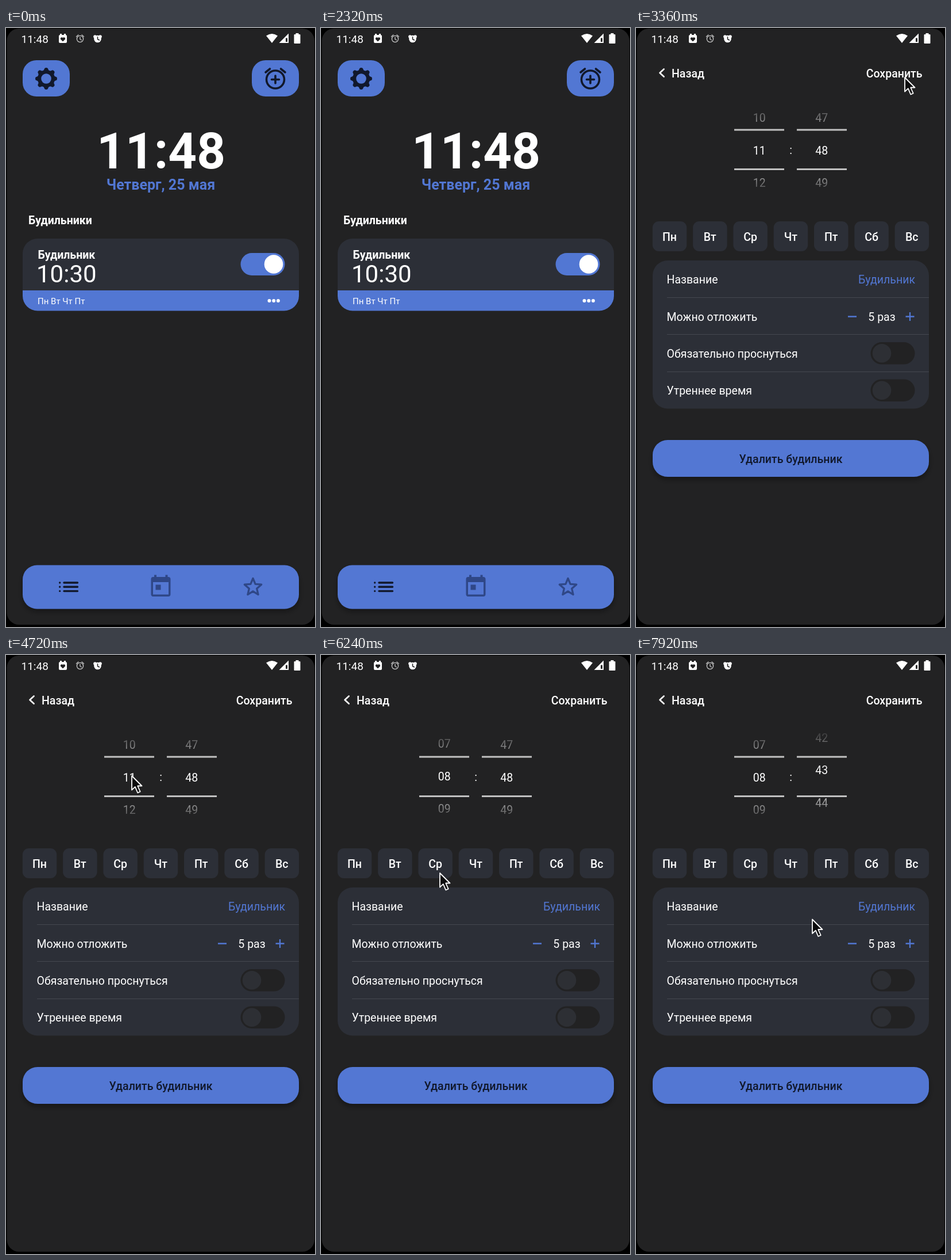
An HTML page for the animation above (8000 ms loop, 538 px wide and 1041 px high).

```html
<!DOCTYPE html>
<html lang="ru">
<head>
<meta charset="utf-8">
<title>Будильник</title>
<style>
  html, body { margin: 0; width: 100%; height: 100%; overflow: hidden; background: #000; }
  svg { display: block; width: 538px; height: 1041px; }
  text { font-family: Roboto, "Noto Sans", sans-serif; font-size: 19.5px; fill: #fff; }
  .bold { font-weight: 700; }
  .medium { font-weight: 500; }
  .mid { text-anchor: middle; }
  .end { text-anchor: end; }
  .line { fill: none; stroke-linecap: round; stroke-linejoin: round; }
</style>
</head>
<body>
<svg viewBox="0 0 538 1041" xmlns="http://www.w3.org/2000/svg">
  <defs>
    <linearGradient id="fade" gradientUnits="userSpaceOnUse" x1="0" y1="127" x2="0" y2="298">
      <stop offset="0" stop-color="#fff" stop-opacity="0"/>
      <stop offset=".44" stop-color="#fff"/>
      <stop offset=".56" stop-color="#fff"/>
      <stop offset="1" stop-color="#fff" stop-opacity="0"/>
    </linearGradient>
    <mask id="wheelMask" maskUnits="userSpaceOnUse" x="160" y="127" width="220" height="171">
      <rect x="160" y="127" width="220" height="171" fill="url(#fade)"/>
    </mask>
    <filter id="shadow" x="-10%" y="-30%" width="120%" height="170%">
      <feDropShadow dx="0" dy="5" stdDeviation="5" flood-color="#000" flood-opacity=".35"/>
    </filter>
    <clipPath id="cardClip"><rect x="29" y="366" width="481" height="125.500" rx="26"/></clipPath>
  </defs>

  <rect x="1.500" y="1" width="535.500" height="1036" rx="21" fill="#222223"/>

  <g id="status" fill="#fff">
    <text x="26.500" y="26" style="font-size:19px">11:48</text>
    <path d="M94 12h10a2 2 0 0 1 2 2v10a2 2 0 0 1-2 2H94a2 2 0 0 1-2-2V14a2 2 0 0 1 2-2zM94 10h3v3h-3zM101 10h3v3h-3z"/>
    <path d="M99 23.500l-4-4a2.400 2.400 0 0 1 4-2.500a2.400 2.400 0 0 1 4 2.500z" fill="#222223"/>
    <g class="line" stroke="#c9c9c9" stroke-width="1.300">
      <circle cx="129" cy="19" r="5.600"/>
      <path d="M129 16v3.500l2.500 1.500M122.500 15l3.500-3M135.500 15l-3.500-3"/>
    </g>
    <circle cx="159.500" cy="19" r="6.300"/>
    <circle cx="155" cy="15" r="2.800"/><circle cx="164" cy="15" r="2.800"/>
    <path class="line" d="M159.500 15.500v4l3 1.500" stroke="#222223" stroke-width="1.500"/>
    <path d="M453 13.500q10-7 20 0L463 26z"/>
    <path d="M492 9.500V26H475.500z"/>
    <path d="M487 17.500h3v6.500h-3z" fill="#222223"/>
    <path d="M504.500 9h5v2h2a1 1 0 0 1 1 1v14a1 1 0 0 1-1 1h-9a1 1 0 0 1-1-1V12a1 1 0 0 1 1-1h2z"/>
  </g>

  <g id="home">
    <rect x="29" y="56" width="82" height="63" rx="24" fill="#5277d3"/>
    <rect x="428" y="56" width="82" height="63" rx="24" fill="#5277d3"/>
    <path id="gear" fill="#11182b"/>
    <circle cx="70" cy="88" r="8.800" fill="#5277d3"/>
    <g class="line" stroke="#11182b" stroke-width="3.600">
      <circle cx="469" cy="89.500" r="15.500"/>
      <path d="M469 83v13M462.500 89.500h13M452 77l7.500-6M486 77l-7.500-6"/>
    </g>

    <text class="bold mid" x="270" y="244" style="font-size:87px">11:48</text>
    <text class="bold mid" x="269.500" y="280.500" style="font-size:25px;fill:#5277d3">Четверг, 25 мая</text>
    <text class="bold" x="39" y="341">Будильники</text>

    <g clip-path="url(#cardClip)">
      <rect x="29" y="366" width="481" height="90" fill="#2c2f37"/>
      <rect x="29" y="456" width="481" height="36" fill="#5277d3"/>
    </g>
    <text class="bold" x="55.500" y="400.500">Будильник</text>
    <text x="53" y="441.500" style="font-size:42px">10:30</text>
    <text x="55" y="480" style="font-size:15px">Пн Вт Чт Пт</text>
    <rect x="408.500" y="391" width="77" height="39" rx="19.500" fill="#5277d3"/>
    <circle cx="466" cy="410.500" r="16.300" fill="#fff"/>
    <path class="line" d="M458.500 474h0M466.200 474h0M473.900 474h0" stroke="#fff" stroke-width="6"/>

    <rect x="29" y="933.500" width="481" height="76" rx="25" fill="#5277d3" filter="url(#shadow)"/>
    <g class="line" stroke="#11182b" stroke-width="3.400">
      <path d="M101 964h23.500M101 971.300h23.500M101 978.600h23.500M93.700 964h0M93.700 971.300h0M93.700 978.600h0"/>
    </g>
    <g fill="#2f4787">
      <path fill-rule="evenodd" d="M256.500 954h26a4 4 0 0 1 4 4v26a4 4 0 0 1-4 4h-26a4 4 0 0 1-4-4v-26a4 4 0 0 1 4-4zM256 963v21.500h27V963z"/>
      <path d="M258 950.500h4v6h-4zM277.500 950.500h4v6h-4zM260.500 967.500h9v9h-9z"/>
    </g>
    <path id="star" class="line" stroke="#2f4787" stroke-width="3.300"/>
  </g>

  <g id="editor">
    <path d="M48.500 71.500L41.500 78l7 6.500" class="line" stroke="#fff" stroke-width="2.700"/>
    <text class="medium" x="62" y="85.500">Назад</text>
    <text class="medium end" x="498.500" y="85.500">Сохранить</text>

    <g mask="url(#wheelMask)"><g id="hours"></g><g id="minutes"></g></g>
    <text class="mid" x="269.500" y="219">:</text>
    <path d="M171 177h87M280 177h87M171 245.500h87M280 245.500h87" stroke="#c1c1c1" stroke-width="3"/>

    <g id="days"></g>

    <rect x="29" y="404" width="481" height="257.500" rx="26" fill="#2c2f37"/>
    <path d="M54 468.500H510M54 532.500H510M54 597.500H510" stroke="#44474f"/>
    <text x="53.500" y="444">Название</text>
    <text x="53.500" y="508.500">Можно отложить</text>
    <text x="53.500" y="572.500">Обязательно проснуться</text>
    <text x="53.500" y="637">Утреннее время</text>
    <text class="end" x="486" y="444" style="fill:#5277d3">Будильник</text>
    <text class="mid" x="428" y="508.500">5 раз</text>
    <path d="M369 501.500h15M469.500 501.500h15M477 494v15" stroke="#5277d3" stroke-width="2.300"/>
    <g id="switches"></g>

    <rect x="29" y="716" width="481" height="64" rx="26" fill="#5277d3" filter="url(#shadow)"/>
    <text class="medium mid" x="269.500" y="755.500" style="fill:#11182b">Удалить будильник</text>
  </g>

  <path id="cursor" d="M0 1V25.500L5.800 20.200L10.300 30.500L14.700 28.500L10.200 18.500H17.500Z"
        fill="#0b0b0c" stroke="#fff" stroke-width="1.800" stroke-linejoin="round"/>
</svg>
<script>
const $ = id => document.getElementById(id);
const LOOP = 8000, STEP = 80, PITCH = 56.3, CENTER = 219.7;
const OPEN = 3360, APPEAR = 2400;

// Cursor tip: [time, x, y]
const path = [
  [2400, 530, 122], [2880, 470, 90], [3360, 468, 85], [3840, 466, 87],
  [4160, 446, 113], [4560, 245, 204], [4720, 219, 209], [5040, 209, 188],
  [5200, 209, 172], [5280, 209, 172], [5360, 211, 190], [5680, 220, 300.5],
  [5920, 213, 360], [6160, 207, 378], [6480, 207, 378], [6960, 314, 162.500],
  [7120, 312, 149], [7280, 312, 150], [7360, 311, 178], [7920, 307, 458.500]
];

function cursorAt(t) {
  let i = 0;
  while (i < path.length - 2 && t >= path[i + 1][0]) i++;
  const [a, b] = [path[i], path[i + 1]];
  const k = Math.min(1, Math.max(0, (t - a[0]) / (b[0] - a[0])));
  return [a[1] + (b[1] - a[1]) * k, a[2] + (b[2] - a[2]) * k];
}

// Wheel distance in rows once the drag passes its threshold
const dragged = (t, from, threshold) =>
  t < from ? 0 : Math.max(0, (cursorAt(t)[1] - threshold) / PITCH);

function hourAt(t) {
  const value = 11 - dragged(Math.min(t, 6160), 5280, 213.500);
  const settle = Math.min(1, Math.max(0, (t - 6160) / 240));
  return value + (8 - value) * (1 - (1 - settle) ** 2);
}
const minuteAt = t => 48 - dragged(t, 7280, 189.500);

const ROWS = 5;
function makeWheel(id, x) {
  $(id).innerHTML = `<text class="mid" x="${x}"></text>`.repeat(ROWS);
  const rows = [...$(id).children];
  return value => rows.forEach((row, i) => {
    const n = Math.round(value) + i - 2;
    row.textContent = String(n).padStart(2, "0");
    row.setAttribute("y", CENTER + (n - value) * PITCH);
  });
}
const setHours = makeWheel("hours", 214.8);
const setMinutes = makeWheel("minutes", 323.3);

function polar(cx, cy, count, radius) {
  return "M" + Array.from({ length: count }, (_, i) => {
    const a = i / count * 2 * Math.PI - Math.PI / 2;
    const r = radius(i, a);
    return (cx + r * Math.cos(a)).toFixed(2) + " " + (cy + r * Math.sin(a)).toFixed(2);
  }).join("L") + "Z";
}
$("gear").setAttribute("d", polar(70, 88, 96, (i, a) => 17 + 2 * Math.tanh(2 * Math.cos(8 * a))));
$("star").setAttribute("d", polar(430, 972, 10, i => i % 2 ? 7 : 15.500));

$("days").innerHTML = ["Пн", "Вт", "Ср", "Чт", "Пт", "Сб", "Вс"].map((day, i) => {
  const x = 28.8 + i * 70.3;
  return `<rect x="${x}" y="336" width="59.5" height="52" rx="11" fill="#2c2f37"/>
    <text class="medium mid" x="${x + 29.7}" y="369.5">${day}</text>`;
}).join("");

$("switches").innerHTML = [565.3, 629.7].map(y =>
  `<rect x="408.5" y="${y - 19.3}" width="77" height="38.6" rx="19.3" fill="#222223"/>
   <circle cx="428" cy="${y}" r="16.3" fill="#2d2f34"/>`).join("");

function show(id, on) { $(id).style.display = on ? "" : "none"; }

function render(t) {
  show("home", t < OPEN);
  show("editor", t >= OPEN);
  show("cursor", t >= APPEAR);
  $("cursor").setAttribute("transform", `translate(${cursorAt(t)})`);
  setHours(hourAt(t));
  setMinutes(minuteAt(t));
}

let start;
function tick(now) {
  start ??= now;
  render(Math.floor((now - start) % LOOP / STEP) * STEP);
  requestAnimationFrame(tick);
}
render(0);
requestAnimationFrame(tick);
</script>
</body>
</html>
```
